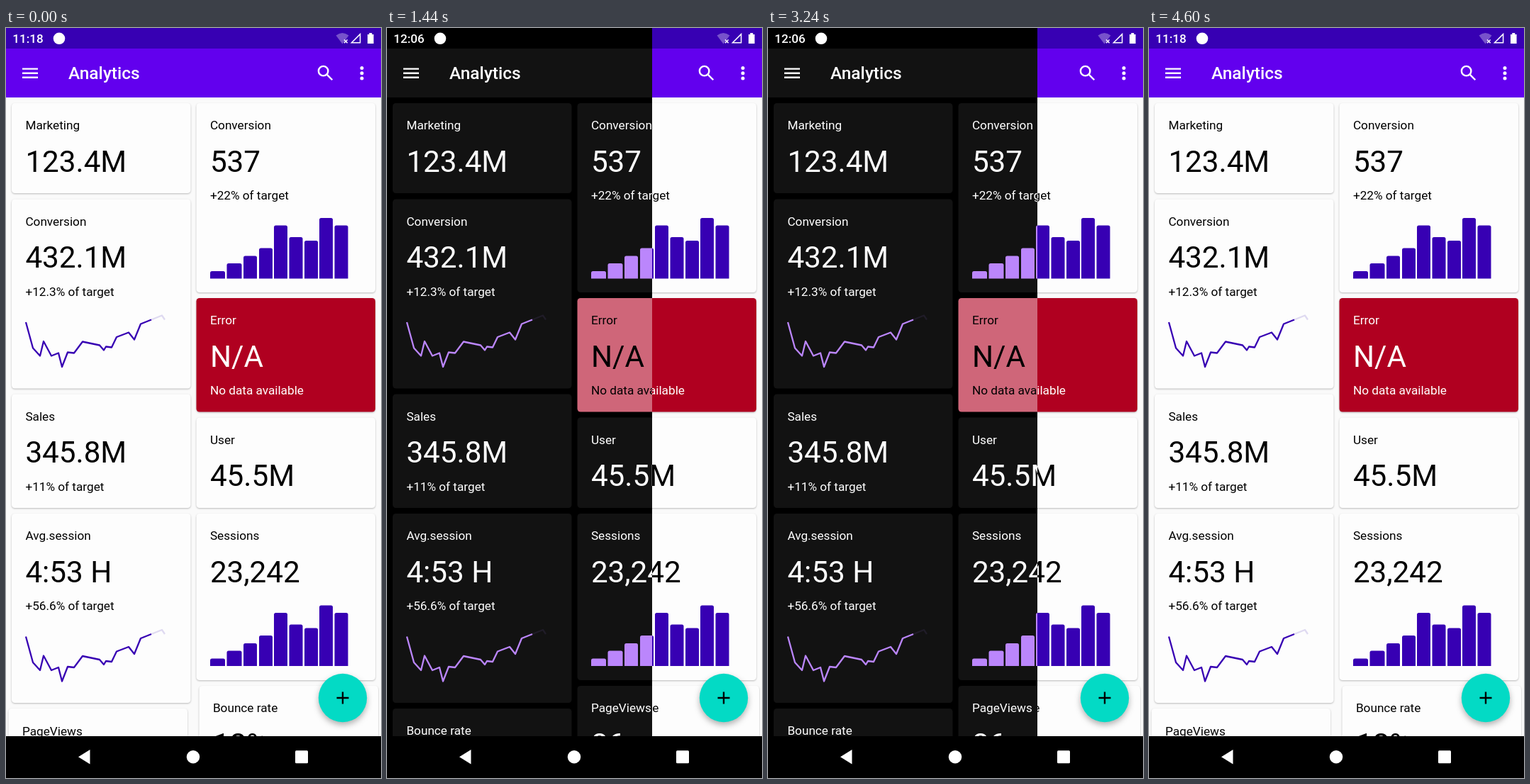
Animation of 529 by 1058 pixels, one loop 5 s. Source, as an HTML page:

```html
<!DOCTYPE html>
<html lang="en">
<head>
<meta charset="utf-8">
<title>Analytics</title>
<style>
  html, body { margin: 0; width: 100%; height: 100%; overflow: hidden; background: #000; }
  #stage { position: relative; width: 529px; height: 1058px; overflow: hidden; }
  .layer { position: absolute; left: 0; top: 0; height: 1058px; overflow: hidden; }
  svg { position: absolute; left: 0; top: 0; display: block; }
  text { font-family: Roboto, sans-serif; font-size: 17.2px; white-space: pre; }
  .title { font-size: 24.5px; font-weight: 500; }
  .clock { font-size: 17.1px; font-weight: 500; }
  .num { font-size: 42.2px; }
  .light .card { filter: drop-shadow(0 1px 1px rgba(0, 0, 0, .26)); }
  .light .fab { filter: drop-shadow(0 4px 4px rgba(0, 0, 0, .3)); }

  #light { width: 529px; }
  #dark { width: 0; animation: wipe 5s -4ms infinite; }
  .first { animation: first 5s -4ms step-end infinite; }
  .later { animation: later 5s -4ms step-end infinite; }

  /* A hand-dragged divider, moving in 40 ms ticks. */
  @keyframes wipe {
    0%    { width: 0;     animation-timing-function: step-end; }
    7.2%  { width: 0;     animation-timing-function: steps(7); }
    12.8% { width: 63px;  animation-timing-function: steps(7); }
    18.4% { width: 167px; animation-timing-function: steps(5); }
    22.4% { width: 284px; animation-timing-function: steps(9); }
    29.6% { width: 385px; animation-timing-function: steps(8); }
    36%   { width: 484px; animation-timing-function: steps(6); }
    40.8% { width: 522px; animation-timing-function: steps(4); }
    44%   { width: 529px; animation-timing-function: step-end; }
    57.6% { width: 529px; animation-timing-function: steps(1); }
    58.4% { width: 512px; animation-timing-function: steps(13); }
    68.8% { width: 298px; animation-timing-function: steps(2); }
    70.4% { width: 274px; animation-timing-function: steps(11); }
    79.2% { width: 113px; animation-timing-function: steps(1); }
    80%   { width: 90px;  animation-timing-function: steps(6); }
    84.8% { width: 36px;  animation-timing-function: steps(8); }
    91.2% { width: 0;     animation-timing-function: step-end; }
    100%  { width: 0; }
  }
  @keyframes first { 0%, 92% { opacity: 1; } 57.6% { opacity: 0; } 100% { opacity: 1; } }
  @keyframes later { 0%, 92% { opacity: 0; } 57.6% { opacity: 1; } 100% { opacity: 0; } }
</style>
</head>
<body>
<div id="stage">
  <div class="layer light" id="light"></div>
  <div class="layer dark" id="dark"></div>
  <svg width="529" height="1058">
    <rect y="999" width="529" height="59"/>
    <g fill="#fff">
      <path d="M102 1028.3L118.5 1018V1038.6Z"/>
      <circle cx="264" cy="1028.3" r="9.2"/>
      <rect x="408" y="1019.3" width="18" height="18" rx="1.5"/>
    </g>
  </svg>
</div>
<script>
const themes = {
  light: { bg: '#fafafa', card: '#fdfdfd', ink: '#000', status: '#3700b3', bar: '#6200ee',
           chart: '#3700b3', faint: '#dfdaf1', error: '#b00020', onError: '#fff', fab: '#03dac5' },
  dark:  { bg: '#000', card: '#121212', ink: '#fff', status: '#000', bar: '#121212',
           chart: '#bb86fc', faint: '#201c28', error: '#cf6679', onError: '#000', fab: '#bb86fc' }
};
const L = 8, R = 268.5;

const text = (x, y, s, fill, cls = '') =>
  `<text class="${cls}" x="${x}" y="${y}" fill="${fill}">${s}</text>`;

function card(x, y, h, label, num, sub, fill, ink) {
  const tx = x + 19.4;
  return `<rect class="card" x="${x}" y="${y}" width="252.5" height="${h}" rx="4.5" fill="${fill}"/>` +
    text(tx, y + 37.3, label, ink) +
    text(tx, y + 96.8, num, ink, 'num') +
    text(tx, y + 136.2, sub, ink);
}

function bars(bottom, fill) {
  const xs = [288, 311.5, 335, 357, 378, 399.5, 421, 442, 463.5];
  const hs = [10.5, 21.5, 32, 43, 75, 58.5, 53.5, 85.5, 75];
  return xs.map((x, i) => {
    const w = i < 2 ? 21 : 19, h = hs[i];
    return `<path fill="${fill}" d="M${x} ${bottom}v${2.5 - h}q0-2.5 2.5-2.5h${w - 5}q2.5 0 2.5 2.5v${h - 2.5}z"/>`;
  }).join('');
}

const line = (y, t) => `<g transform="translate(0 ${y})" fill="none" stroke-width="2.3" stroke-linejoin="round">
  <path stroke="${t.faint}" d="M205 6L220 0L224 6"/>
  <path stroke="${t.chart}" d="M28 9.5L38 46L48 57L53 36.5L64 57L74 53L79 72.5L87 52L96 53L108 37L132 42L138 49L141 44L149 45L156 30.5L173 24L181 34L190 12L205 6"/></g>`;

const icons = `
  <g fill="#fff">
    <circle cx="75" cy="14.8" r="8.3"/>
    <path opacity=".32" d="M474.5 22.5L465.5 10.5Q474.5 3.5 483.5 10.5Z"/>
    <path d="M510 9h2.3V7h4V9h2.3V22h-8.6Z"/>
    <circle cx="502" cy="56.4" r="2.5"/><circle cx="502" cy="63.7" r="2.5"/><circle cx="502" cy="71.1" r="2.5"/>
  </g>
  <g fill="none" stroke="#fff">
    <path stroke-width="1.5" d="M477 16.5l4.6 4.6m0-4.6l-4.6 4.6M487.5 20.8H499.6V8.6Z"/>
    <path stroke-width="2.4" d="M23 57.6h22M23 63.7h22M23 69.8h22"/>
    <g transform="translate(436 49) scale(1.2245)" stroke-width="2">
      <circle cx="9.5" cy="9.5" r="5.5"/><path d="M13.6 13.6L19.8 19.8"/>
    </g>
  </g>`;

function screen(name) {
  const t = themes[name], light = name === 'light';
  const add = (x, y, h, label, num, sub = '') => card(x, y, h, label, num, sub, t.card, t.ink);
  const last = light
    ? add(3.5, 960, 120, '', '') +
      `<g class="first">${text(23, 997.5, 'PageViews', t.ink)}</g>` +
      `<g class="later">${text(27.4, 997.5, 'Bounce rate', t.ink)}</g>` +
      add(272.5, 928, 130, 'Bounce rate', '18%')
    : add(L, 960, 120, 'Bounce rate', '18%') + add(R, 928, 130, 'PageViews', '86');
  const clock = light
    ? `<g class="first">${text(9.3, 21, '11:18', '#fff', 'clock')}</g>` +
      `<g class="later">${text(9.3, 21, '12:06', '#fff', 'clock')}</g>`
    : text(9.3, 21, '12:06', '#fff', 'clock');
  return `<svg width="529" height="1058">
    <rect width="529" height="1058" fill="${t.bg}"/>
    <rect width="529" height="98" fill="${t.bar}"/>
    <rect width="529" height="29" fill="${t.status}"/>
    ${clock}${text(88, 72.4, 'Analytics', '#fff', 'title')}${icons}
    ${add(L, 106, 127, 'Marketing', '123.4M')}
    ${add(L, 241.5, 267, 'Conversion', '432.1M', '+12.3% of target')}${line(405.5, t)}
    ${add(L, 516.5, 160.5, 'Sales', '345.8M', '+11% of target')}
    ${add(L, 685, 267, 'Avg.session', '4:53 H', '+56.6% of target')}${line(849, t)}
    ${add(R, 106, 267, 'Conversion', '537', '+22% of target')}${bars(353.5, t.chart)}
    ${card(R, 381, 160.5, 'Error', 'N/A', 'No data available', t.error, t.onError)}
    ${add(R, 549.5, 127.5, 'User', '45.5M')}
    ${add(R, 685, 235, 'Sessions', '23,242')}${bars(900, t.chart)}
    ${last}
    <circle class="fab" cx="475" cy="945" r="34.2" fill="${t.fab}"/>
    <path d="M466.5 945h17M475 936.5v17" stroke="#000" stroke-width="2.4"/>
  </svg>`;
}

for (const name in themes) document.getElementById(name).innerHTML = screen(name);
</script>
</body>
</html>
```
